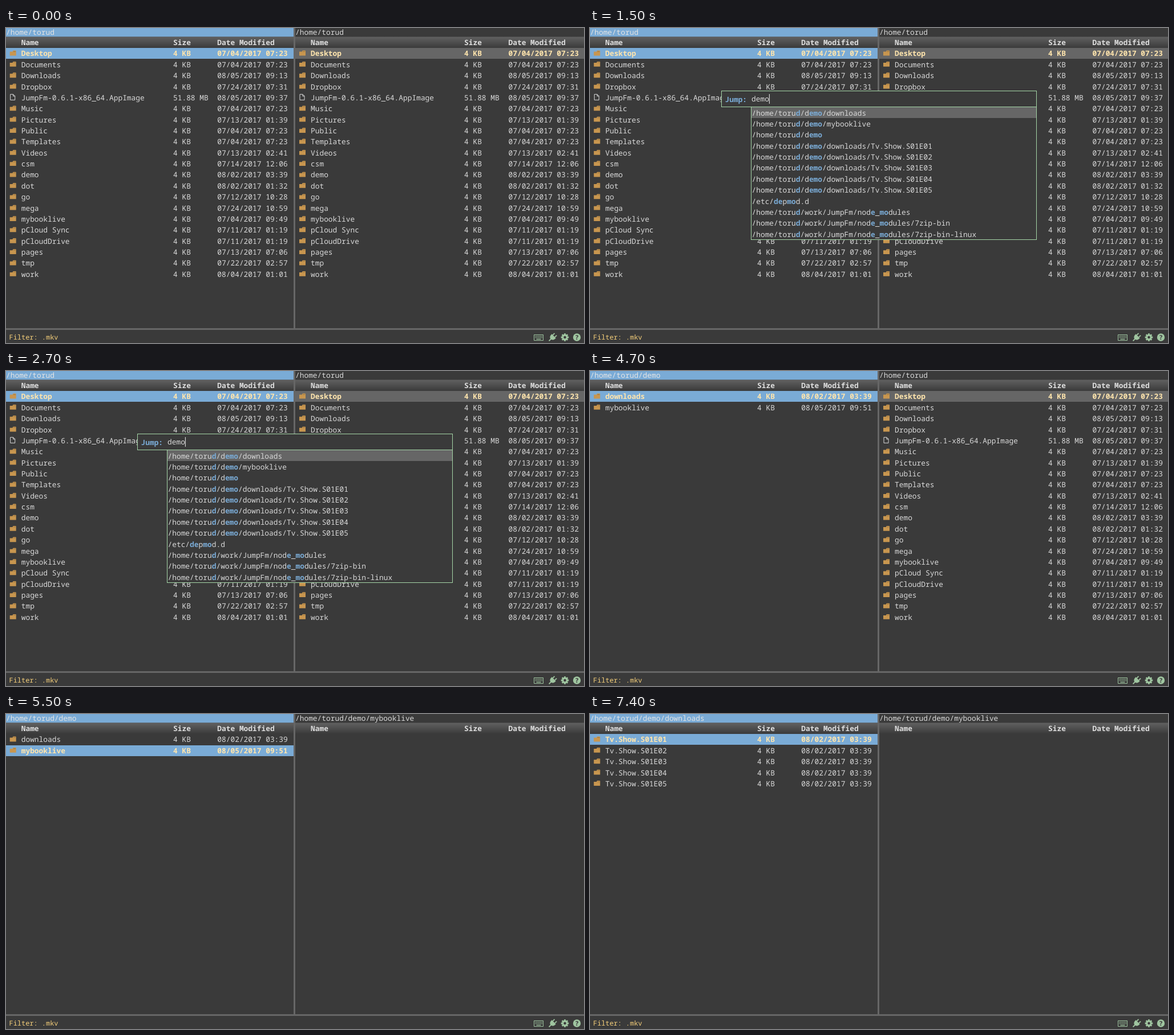
Write an HTML page with a canvas that moves like this. It is 1013x553 px and loops after 8 s.

```html
<!DOCTYPE html>
<html lang="en">
<head>
<meta charset="utf-8">
<title>Dual pane file manager</title>
<style>
html, body { margin: 0; width: 100%; height: 100%; overflow: hidden; background: #3a3a3a; }
canvas { display: block; }
</style>
</head>
<body>
<canvas id="stage" width="1013" height="553"></canvas>
<script>
const ctx = document.getElementById('stage').getContext('2d');
const BG = '#3a3a3a', GREY = '#666666', BLUE = '#7aabd6', TEXT = '#d9d9d9',
      CREAM = '#ffe5ad', FOLDER = '#c8964f', GREEN = '#a5d6a7', ICON = '#9fc5a0';
const SIZE = 12.87, ADVANCE = SIZE * 0.6, PITCH = 19.37, LIST_TOP = 35.4;
const LOOP = 8000, HOME = '/home/torud';

// Each entry is "name|MM/DD hh:mm|size"; the size defaults to 4 KB.
const homeFiles = `Desktop|07/04 07:23
Documents|07/04 07:23
Downloads|08/05 09:13
Dropbox|07/24 07:31
JumpFm-0.6.1-x86_64.AppImage|08/05 09:37|51.88 MB
Music|07/04 07:23
Pictures|07/13 01:39
Public|07/04 07:23
Templates|07/04 07:23
Videos|07/13 02:41
csm|07/14 12:06
demo|08/02 03:39
dot|08/02 01:32
go|07/12 10:28
mega|07/24 10:59
mybooklive|07/04 09:49
pCloud Sync|07/11 01:19
pCloudDrive|07/11 01:19
pages|07/13 07:06
tmp|07/22 02:57
work|08/04 01:01`.split('\n');
const demoFiles = ['downloads|08/02 03:39', 'mybooklive|08/05 09:51'];
const episodes = [1, 2, 3, 4, 5].map(n => `Tv.Show.S01E0${n}`);
const episodeFiles = episodes.map(name => name + '|08/02 03:39');

// Matched letters stand between asterisks.
const devMatches = ['', '/block', '/bsg', '/bus', '/char', '/cpu', '/disk', '/dri', '/fd',
  '/hugepages', '/input', '/lightnvm'].map(path => '/*de*v' + path);
const homeMatch = '/home/toru*d*', demoMatch = homeMatch + '/d*emo*';
const modulesMatch = homeMatch + '/work/JumpFm/nod*e*_*mo*dules';
const demoMatches = [
  demoMatch + '/downloads', demoMatch + '/mybooklive', demoMatch,
  ...episodes.map(name => `${demoMatch}/downloads/${name}`),
  '/etc/*de*p*mo*d.d',
  modulesMatch, modulesMatch + '/7zip-bin', modulesMatch + '/7zip-bin-linux'
];

const atHome = { path: HOME, files: homeFiles, selected: 0 };
const atDemo = { path: HOME + '/demo', files: demoFiles, selected: 0 };
const atBooks = { path: HOME + '/demo/mybooklive', files: [] };
const atDownloads = { path: HOME + '/demo/downloads', files: episodeFiles, selected: 0 };
const scenes = [
  { start: 0, left: atHome, right: atHome },
  { start: 500, left: atHome, right: atHome, query: 'de', matches: devMatches },
  { start: 1500, left: atHome, right: atHome, query: 'demo', matches: demoMatches },
  { start: 3500, left: atDemo, right: atHome },
  { start: 5500, left: { ...atDemo, selected: 1 }, right: atBooks },
  { start: 6500, left: atDownloads, right: atBooks }
];

function rect(x, y, w, h, color) {
  ctx.fillStyle = color;
  ctx.fillRect(x, y, w, h);
}

function text(str, x, y, color = TEXT, bold = false, size = SIZE) {
  ctx.font = `${bold ? 700 : 400} ${size}px "Noto Sans Mono", monospace`;
  ctx.fillStyle = color;
  ctx.fillText(str, x, y);
}

function fillPath(d, color) {
  ctx.fillStyle = color;
  ctx.fill(new Path2D(d));
}

function strokePath(d, color, width = 1) {
  ctx.strokeStyle = color;
  ctx.lineWidth = width;
  ctx.stroke(new Path2D(d));
}

function fileIcon(x, y, isFolder) {
  ctx.save();
  ctx.translate(x, y);
  if (isFolder) {
    fillPath('M0 6.2H5V5.2L6 4.2H10.4L11 4.8V13H0Z', FOLDER);
    strokePath('M6.2 6H10.2', '#8a6a3c', 0.7);
  } else {
    strokePath('M1 3.5H6L9 6.5V13.5H1ZM5.8 3.5V6.7H9', TEXT);
  }
  ctx.restore();
}

function pane({ path, files, selected }, x, width, columns, active) {
  rect(x, 0, width, 15.5, active ? BLUE : BG);
  text(path, x, 11.7, active ? '#e4e4e4' : TEXT);

  const shade = ctx.createLinearGradient(0, 15.5, 0, 35);
  shade.addColorStop(0, '#616161');
  shade.addColorStop(1, BG);
  rect(x, 15.5, width, 19.5, shade);
  ['Name', 'Size', 'Date Modified'].forEach((title, i) => text(title, columns[i], 30.2, '#dedede', true));

  files.forEach((file, row) => {
    const [name, date, size = '4 KB'] = file.split('|');
    const top = LIST_TOP + row * PITCH, isSelected = row === selected;
    if (isSelected) rect(x, Math.round(top), width, 19, active ? BLUE : GREY);
    fileIcon(columns[0] - 20, top, !name.endsWith('.AppImage'));
    [name, size, date.replace(' ', '/2017 ')].forEach((cell, i) =>
      text(cell, columns[i], top + 14, isSelected ? CREAM : TEXT, isSelected));
  });
}

function frame(x, y, w, h) {
  rect(x, y, w, h, GREEN);
  rect(x + 1, y + 1, w - 2, h - 2, BG);
}

function jumpBox(query, matches) {
  frame(230, 110, 553, 29);
  text('Jump:', 236.5, 129.8, BLUE, true);
  text(query, 283, 129.2);
  rect(283 + query.length * ADVANCE, 116, 1, 17, '#eeeeee');
  frame(282, 138, 501, 234);
  rect(283, 139, 499, 19, GREY);
  ctx.save();
  ctx.beginPath();
  ctx.rect(283, 139, 499, 232);
  ctx.clip();
  matches.forEach((match, row) => {
    let x = 283.5;
    match.split('*').forEach((part, i) => {
      const hit = i % 2 === 1;
      text(part, x, 153.6 + row * PITCH, hit ? BLUE : TEXT, hit);
      x += part.length * ADVANCE;
    });
  });
  ctx.restore();
}

function keyboardIcon() {
  strokePath('M925.5 538.5H941.5V548.5H925.5Z', ICON);
  ctx.setLineDash([1.3, 1]);
  strokePath('M927.5 541H940M927.5 543.5H940', ICON, 1.3);
  ctx.setLineDash([]);
  strokePath('M929.5 546.3H937.5', ICON, 1.3);
}

function plugIcon() {
  ctx.save();
  ctx.translate(958, 543);
  ctx.rotate(Math.PI / 4);
  fillPath('M-5 -3H5V-1C5 2 3 4 1 4.4V9H-1V4.4C-3 4 -5 2 -5 -1Z', ICON);
  strokePath('M-2.6 -3V-7.5M2.6 -3V-7.5', ICON, 1.8);
  ctx.restore();
}

function gearIcon() {
  ctx.save();
  ctx.translate(979.5, 543);
  for (let i = 0; i < 8; i++) {
    rect(-1.5, -6.8, 3, 3.5, ICON);
    ctx.rotate(Math.PI / 4);
  }
  ctx.beginPath();
  ctx.arc(0, 0, 3.7, 0, 7);
  ctx.strokeStyle = ICON;
  ctx.lineWidth = 3;
  ctx.stroke();
  ctx.restore();
}

function helpIcon() {
  ctx.beginPath();
  ctx.arc(1000.5, 543, 6.7, 0, 7);
  ctx.fillStyle = ICON;
  ctx.fill();
  text('?', 997.2, 547, BG, true, 11);
}

function draw(now) {
  const time = now % LOOP;
  const scene = scenes.findLast(({ start }) => start <= time);
  ctx.textRendering = 'geometricPrecision';
  rect(0, 0, 1013, 553, BG);
  pane(scene.left, 0, 504, [26.7, 293, 370.3], true);
  pane(scene.right, 507, 506, [534, 803, 880.5], false);
  rect(504, 0, 3, 527, GREY);
  rect(0, 527, 1013, 3, GREY);
  text('Filter: .mkv', 5.5, 547, '#f5cf7a', false, 11.95);
  keyboardIcon();
  plugIcon();
  gearIcon();
  helpIcon();
  if (scene.query) jumpBox(scene.query, scene.matches);
}

function tick() {
  draw(performance.now());
  requestAnimationFrame(tick);
}
tick();
</script>
</body>
</html>
```
